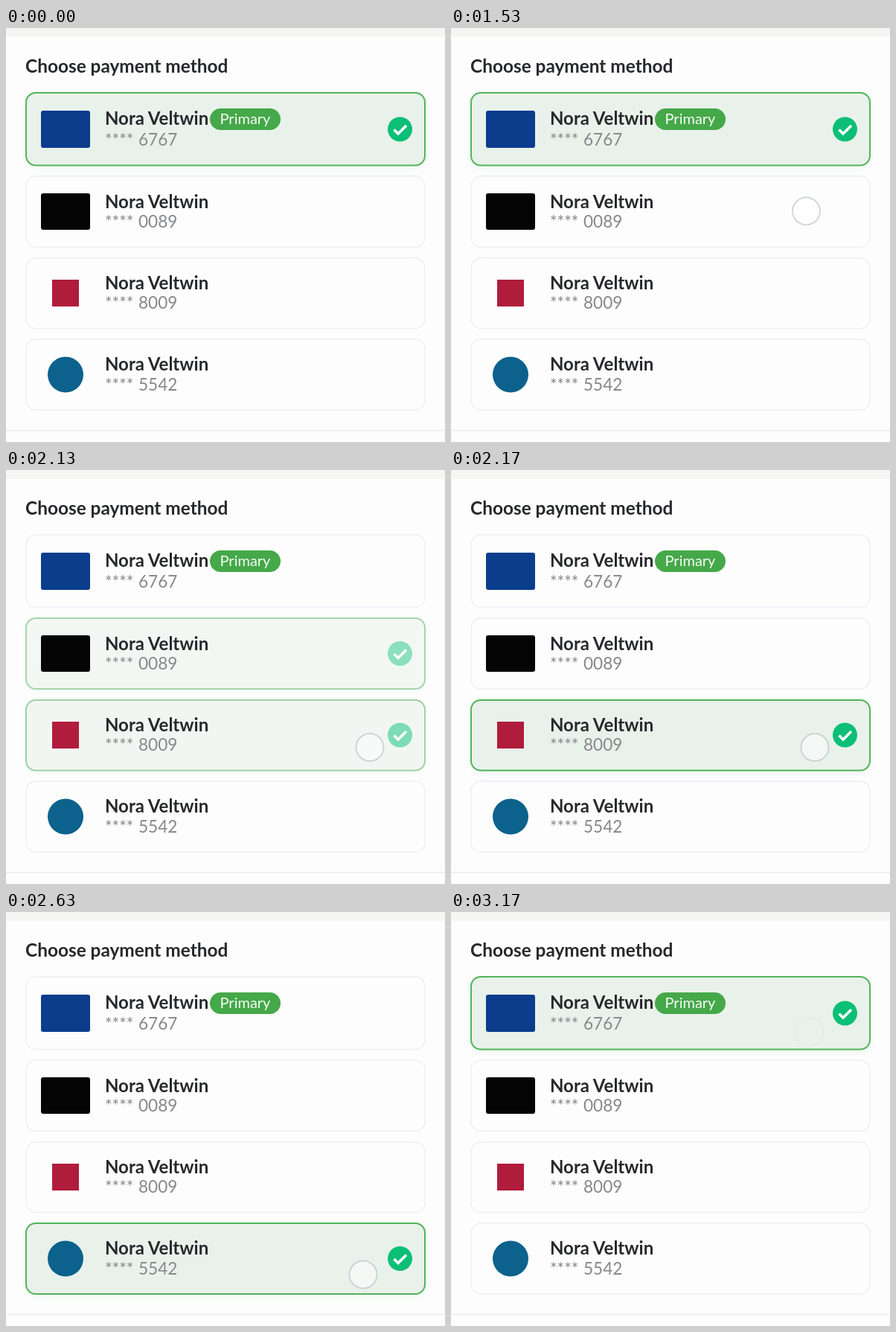
An HTML page that plays this animation: 590 px wide and 556 px high, repeating every 3.2 s.

```html
<!DOCTYPE html>
<html lang="en">
<head>
<meta charset="utf-8">
<title>Choose payment method</title>
<style>
  html, body { margin: 0; width: 100%; height: 100%; overflow: hidden; background: #fdfdfd; }
  svg { display: block; width: 590px; height: 556px; font-family: Lato, sans-serif; }
  .bold { font-weight: 700; font-size: 24px; fill: #27282c; }
  .number { font-size: 22.6px; fill: #87888b; }
  .card { fill: none; stroke: #eeeef5; stroke-width: 1.5; }
  .active .card { fill: #e9f1eb; stroke: #52b45a; stroke-width: 2; filter: drop-shadow(0 3px 5px rgba(76, 175, 80, .07)); }
</style>
</head>
<body>
<svg id="stage" viewBox="0 0 590 556">
  <rect width="590" height="556" fill="#fdfdfd"/>
  <rect width="590" height="12" fill="#f5f5f4"/>
  <path d="M0 540.5H590" stroke="#e9e9ea" stroke-width="1.5"/>
  <text class="bold" x="26" y="59.5" style="font-size:24.4px">Choose payment method</text>
  <g id="rows"></g>
  <circle id="tap" r="18.5" fill="#fff" fill-opacity=".5" stroke="#b4bcc8" stroke-opacity=".6" stroke-width="2"/>
</svg>
<script>
const LOOP = 3200, HOLDER = 'Nora Veltwin';
const rows = [
  { y: 87, h: 97.5, mid: 136, name: 129.5, num: 158, digits: '6767',
    badge: '<rect x="47" y="111" width="66" height="50" rx="3" fill="#0b3d8c"/>' },
  { y: 199, h: 95, mid: 246.5, name: 241.5, num: 267.5, digits: '0089',
    badge: '<rect x="47" y="222" width="66" height="49" rx="3" fill="#050505"/>' },
  { y: 309, h: 94.5, mid: 356, name: 351, num: 377, digits: '8009',
    badge: '<rect x="62" y="338" width="36" height="36" fill="#b01c3c"/>' },
  { y: 418, h: 95, mid: 465.5, name: 460, num: 487, digits: '5542',
    badge: '<circle cx="80" cy="465.5" r="24" fill="#0c628c"/>' }
];
const taps = [
  { select: 1560, row: 1, x: 477.5, y: 246 },
  { select: 2105, row: 2, x: 489, y: 372.5 },
  { select: 2530, row: 3, x: 480, y: 487 },
  { select: 2990, row: 0, x: 482, y: 161 }
];

const card = r => `<rect class="card" x="27" y="${r.y}" width="536" height="${r.h}" rx="13"/>`;
const pill = `<rect x="274" y="108" width="95" height="29" rx="14.5" fill="#45a849"/>
  <text x="321.5" y="129" font-size="20" text-anchor="middle" fill="#f6fbf6">Primary</text>`;

document.getElementById('rows').innerHTML = rows.map((r, i) => `
  ${card(r)}
  <g class="active">${card(r)}
    <circle cx="529.5" cy="${r.mid}" r="16.5" fill="#0bbf76"/>
    <path d="M521.5 ${r.mid + .5}l5.5 5.5 11-11" fill="none" stroke="#fff" stroke-width="3.6"/>
  </g>
  ${r.badge}
  <text class="bold" x="133" y="${r.name}">${HOLDER}</text>
  <text class="number" x="133" y="${r.num}">****</text>
  <text class="number" x="178" y="${r.num}">${r.digits}</text>
  ${i ? '' : pill}`).join('');

const actives = document.querySelectorAll('.active');
const tapCircle = document.getElementById('tap');
const ramp = (t, from, to) => {
  const p = Math.min(1, Math.max(0, (t - from) / (to - from)));
  return p * p * (3 - 2 * p);
};

function draw(t) {
  const levels = [1, 0, 0, 0];
  let opacity = 0;
  for (const { select, row, x, y } of taps) {
    const age = t - select;
    if (age < -180) break;
    const chosen = ramp(age, 0, 50);
    levels.forEach((v, i) => levels[i] = v + ((i === row) - v) * chosen);
    opacity = ramp(age, -180, -80) * (1 - ramp(age, 90, 210));
    tapCircle.setAttribute('cx', x);
    tapCircle.setAttribute('cy', y);
  }
  tapCircle.setAttribute('opacity', opacity);
  actives.forEach((el, i) => el.setAttribute('opacity', levels[i]));
}

function frame() {
  draw(performance.now() % LOOP);
  requestAnimationFrame(frame);
}
frame();
</script>
</body>
</html>
```
